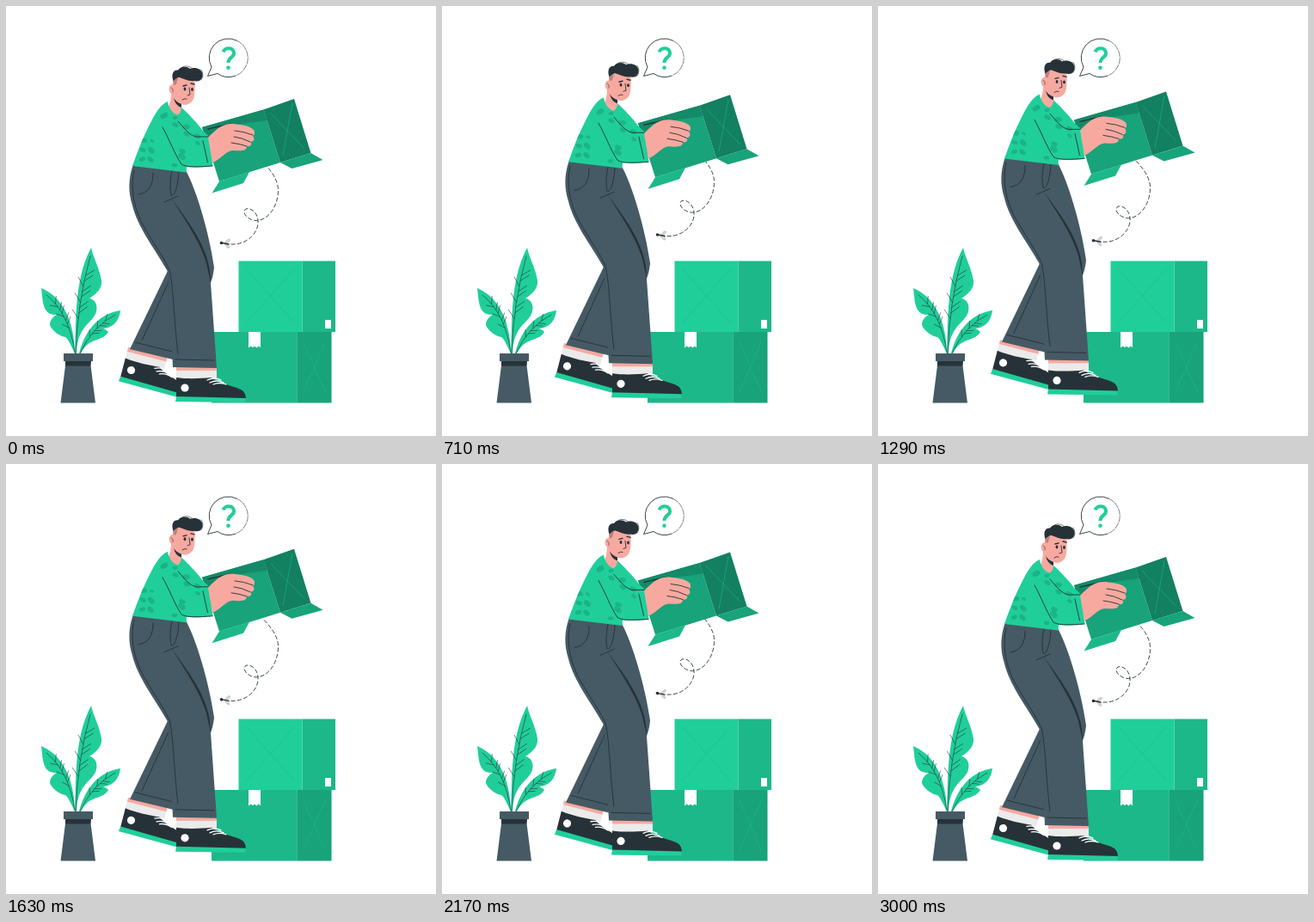
Write an HTML page that moves like this. It is 500 px wide and 500 px high and loops after 3.04 s.

```html
<!DOCTYPE html>
<html lang="en">
<head>
<meta charset="utf-8">
<title>Moving boxes</title>
<style>
  html, body { margin: 0; width: 100%; height: 100%; overflow: hidden; background: #fff; }
  svg { display: block; width: 100vw; height: 100vh; }
  .green { fill: #20ce9a; }
  .mid { fill: #1cb88a; }
  .deep { fill: #18a37a; }
  .slate { fill: #455a64; }
  .ink { fill: #263238; }
  .skin { fill: #f7a9a0; }
  .sock { fill: #ebebeb; }
  .white { fill: #fff; }
  .line, .fine, .bold { fill: none; stroke: #263238; stroke-width: .9; stroke-linecap: round; stroke-linejoin: round; }
  .fine { stroke-width: .6; }
  .bold { stroke-width: 1.4; }
  .cross { fill: none; stroke: #1cb88a; stroke-width: .6; }
  .lace { fill: none; stroke: #fff; stroke-width: 1.3; stroke-linecap: round; }
</style>
</head>
<body>
<svg viewBox="0 0 500 500">
  <defs>
    <!-- origin at the round ankle badge -->
    <g id="foot">
      <rect class="sock" x="-10" y="-22" width="47" height="12"/>
      <rect class="skin" x="-10" y="-25" width="47" height="5"/>
      <path class="ink" d="M-10 -12C4 -10 19 -11 31 -12C38 -6 53 -3 63 1C69 3 71 8 71 13L-10 12Z"/>
      <path class="green" d="M-10 10L71 12L70 17L-11 16Z"/>
      <circle class="white" r="4.600"/>
      <path class="lace" d="M26 -9q8 -4 16 0M29 -6q8 -4 16 0M33 -4q7 -3 15 0"/>
    </g>
    <clipPath id="sweater"><use href="#sweaterShape"/></clipPath>
  </defs>

  <!-- stacked boxes -->
  <rect class="mid" x="239" y="379" width="99.500" height="82.500"/>
  <rect class="deep" x="338.500" y="379" width="40" height="82.500"/>
  <path class="cross" d="M338.500 379V461M345 389L372 451M372 389L345 451"/>
  <path class="white" d="M282 379H296V397l-2.500 -1.500l-2 2l-2.500 -2l-2 1.500l-2.500 -1.500l-2.500 2Z"/>
  <rect class="green" x="270.500" y="296.500" width="74" height="82.500"/>
  <rect class="mid" x="344.500" y="296.500" width="38.500" height="82.500"/>
  <path class="cross" stroke-opacity=".9" d="M279 305L336 369M336 305L279 369"/>
  <rect class="white" x="371" y="365" width="7" height="10"/>

  <!-- plant -->
  <path class="green" d="M99 281C102 294 108 303 111 319C112 328 106 334 97 340C103 341 107 347 105 355C102 369 83 370 82 404H80C82 374 78 320 99 281Z"/>
  <path class="green" d="M41 328C72 341 80 378 80 404C76 396 73 388 69 385C64 384 55 380 51 371C51 364 56 361 59 359C42 360 43 343 41 328Z"/>
  <path class="green" d="M133 354C132 363 127 374 113 375C116 376 118 378 119 379C112 391 97 384 87 404H85C91 380 106 358 133 354Z"/>
  <path id="veins" class="fine"/>
  <path class="slate" d="M67 404H101V413H67ZM69 418H98.500L104 461.500H63.500Z"/>
  <path class="ink" d="M69 413H99L98.500 418.500H69Z"/>

  <!-- speech bubble -->
  <path class="line" d="M268 40A22.300 22.300 0 0 0 239 71L234.500 81.500L246 78.500A22.300 22.300 0 0 0 266 81.500"/>
  <path class="fine" stroke-dasharray="7 1.500" d="M268 40A22.300 22.300 0 0 1 266 81.500"/>
  <path d="M252.700 53.500C254 47.500 265 47.500 265 55C265 60 258.500 59.500 258.500 66" fill="none" stroke="#20ce9a" stroke-width="4"/>
  <circle class="green" cx="258.500" cy="71.700" r="2.300"/>

  <g id="fly">
    <path class="line" stroke-dasharray="4.200 3.200" d="M262 277C278 278 292 266 293 253C294 241 285 234 279 236C274 239 279 248 290 249.500C305 250 317 232 316.500 213C316 201 307 190 299 182"/>
    <g transform="translate(255 276)" fill="#d5d8d9" stroke="#9aa3a7" stroke-width=".4">
      <ellipse cx="3.500" rx="3.500" ry="1.500" transform="rotate(-40)"/>
      <ellipse cx="3.500" rx="3.500" ry="1.500" transform="rotate(50)"/>
    </g>
    <path class="bold" d="M251 275.500L259 277"/>
    <circle class="ink" cx="250.500" cy="275.500" r="1.800"/>
  </g>

  <g id="man">
    <!-- carried box -->
    <path class="deep" d="M228 141L299.500 120.500L319 182L248 204Z"/>
    <path d="M228 141L299.500 120.500L303.500 133L268 138L234 158Z" fill="#148a68"/>
    <path d="M299.500 120.500L335 108L354.500 171L319 182Z" fill="#128061"/>
    <path class="cross" d="M307 124L347 166M333 113L322 174"/>
    <path class="deep" d="M319 182L354.500 171L368.500 179L332.500 189Z"/>
    <path class="mid" d="M248 204L283 193L276 206L239.500 217.500Z"/>
    <path class="bold" stroke-dasharray="3 1" d="M235 143L261 137"/>

    <!-- legs -->
    <use href="#foot" transform="translate(145.500 423.500) rotate(14.500)"/>
    <path class="slate" d="M188 308L144 399L194 411L198 320Z"/>
    <path class="line" d="M189 321L158 389M150 391L194 402"/>
    <path class="ink" d="M190 314L189 324L194 375L195 330Z"/>
    <use href="#foot" transform="translate(208 444)"/>
    <path class="slate" d="M148 184L209 191C221 213 236 262 242 304C241 314 239 319 238 322L245 421L194 420L189 322C190 315 189 311 187 307C172 281 153 257 147 232C142 216 142 201 148 184Z"/>
    <path class="line" d="M149 191C144 212 149 236 160 256C171 275 185 295 190 307C195 327 195 365 200 404M171 194C171 209 166 217 154 219M193 192C190 205 191 215 192 220C196 222 200 210 201 193M184 228L200 221M197 411L242 412"/>
    <path class="ink" d="M192 223C205 244 226 274 233 299L238 322C239 280 206 244 192 223Z"/>

    <!-- head -->
    <path class="skin" d="M194 78H219C220 96 220 105 217 110C213 115 208 116 204 114V121C205 126 200 129 196 126L188 119C191 114 192 107 192 102C189 100 188 92 194 91Z"/>
    <path d="M194 82L200 83L198 91L195 92Z" fill="#b98280"/>
    <path class="ink" d="M195 107Q198 112 204 114V118Q197 116 195 107Z"/>
    <path class="ink" d="M194.500 87C192 80 194 74 200 74.500C203 70 210 69.500 214 73C219 71 227 72 228.500 79C229 85 225 89 219 87C213 88 207 85 203 83.500C200 82 198 84 194.500 87Z"/>
    <path class="fine" d="M202 73Q209 67 216 72M227 74Q231 80 227 86M192 95Q195 96 194 100"/>
    <ellipse class="ink" cx="208" cy="96.500" rx="1.400" ry="2"/>
    <ellipse class="ink" cx="216.500" cy="97" rx="1.400" ry="2"/>
    <path class="bold" d="M206 93L210 92M215 90L219 91"/>
    <path class="line" d="M213 95L214 103L211 104M205 109Q208 107 210 108"/>

    <!-- sweater -->
    <path id="sweaterShape" class="green" d="M188 111C189 119 194 125 199 126.500C202 126 204 122 204 118C211 124 222 136 229 145L236 151.500L240.500 186C230 188 219 188 210 187L209.500 193.500L147 186C152 172 158 156 164 144C171 130 177 116 188 111Z"/>
    <g id="spots" fill="#1ab486" clip-path="url(#sweater)"></g>
    <path class="line" d="M182 141C189 153 196 172 204 184C210 188 224 187 240 186M200 134C208 143 213 150 221 152H236M229 157L234.500 182"/>

    <!-- hand -->
    <path class="skin" d="M235 153C242 146 249 138 260 137C271 137 283 139 288 144C290 147 289 150 287 151C290 155 288 158 284 158C287 161 284 164 280 163C280 168 275 169 264 168C256 168 251 177 240 182.500Z"/>
    <path class="line" d="M266 145Q277 146 287 150M265 152Q274 153 284 158M262 159Q271 160 280 163"/>
  </g>
</svg>
<script>
const LOOP = 3040, FPS = 24, LIFT = 10;
const byId = id => document.getElementById(id);
const mix = (a, b, u) => a + (b - a) * u;

let seed = 7;
function random() {
  seed = seed * 16807 % 2147483647;
  return seed / 2147483647;
}

// A loose trail of leaf-like spots, alternating to either side
function spotTrail(x0, y0, x1, y1, count, spread) {
  return Array.from({ length: count }, (_, i) => {
    const u = i / (count - 1), side = i % 2 ? spread : -spread;
    const x = mix(x0, x1, u) + side, y = mix(y0, y1, u) - side / 2;
    const tilt = mix(-30, 50, random()), size = mix(2.5, 5, random());
    return `<ellipse rx="${size}" ry="${size * .65}" transform="translate(${x} ${y}) rotate(${tilt})"/>`;
  }).join('');
}

// A curved midrib with short side veins that lean toward the tip
function rib(x0, y0, cx, cy, x1, y1, count, length) {
  const at = u => [mix(mix(x0, cx, u), mix(cx, x1, u), u), mix(mix(y0, cy, u), mix(cy, y1, u), u)];
  let d = `M${x0} ${y0}Q${cx} ${cy} ${x1} ${y1}`;
  for (let i = 0; i < count; i++) {
    const u = mix(.35, .85, i / count), [x, y] = at(u), [nx, ny] = at(u + .05);
    const along = Math.atan2(ny - y, nx - x);
    const angle = along + (i % 3 ? .8 : -.7);
    d += `M${x} ${y}l${length * Math.cos(angle)} ${length * Math.sin(angle)}`;
  }
  return d;
}

byId('spots').innerHTML =
  spotTrail(187, 126, 226, 158, 7, 3) +
  spotTrail(165, 154, 163, 181, 6, 5) +
  spotTrail(207, 168, 198, 184, 3, 2);
byId('veins').setAttribute('d',
  rib(81, 404, 83, 345, 98, 291, 9, 12) +
  rib(80, 403, 74, 358, 47, 336, 8, 9) +
  rib(86, 404, 100, 373, 127, 359, 7, 8));

// Linear rise and fall, at rest whenever t is a multiple of the period
function float(t, period) {
  const phase = t % period / period;
  return -LIFT * (1 - Math.abs(1 - 2 * phase));
}

function lift(node, y) {
  node.setAttribute('transform', `translate(0 ${y.toFixed(3)})`);
}

function draw(now) {
  const t = Math.floor((now % LOOP + 4.9) * FPS / 1000) * 1000 / FPS;
  lift(byId('man'), float(t, 3000));
  lift(byId('fly'), float(t, 1500));
}

const start = performance.now();
function tick() {
  draw(performance.now() - start);
  requestAnimationFrame(tick);
}
tick();
</script>
</body>
</html>
```
